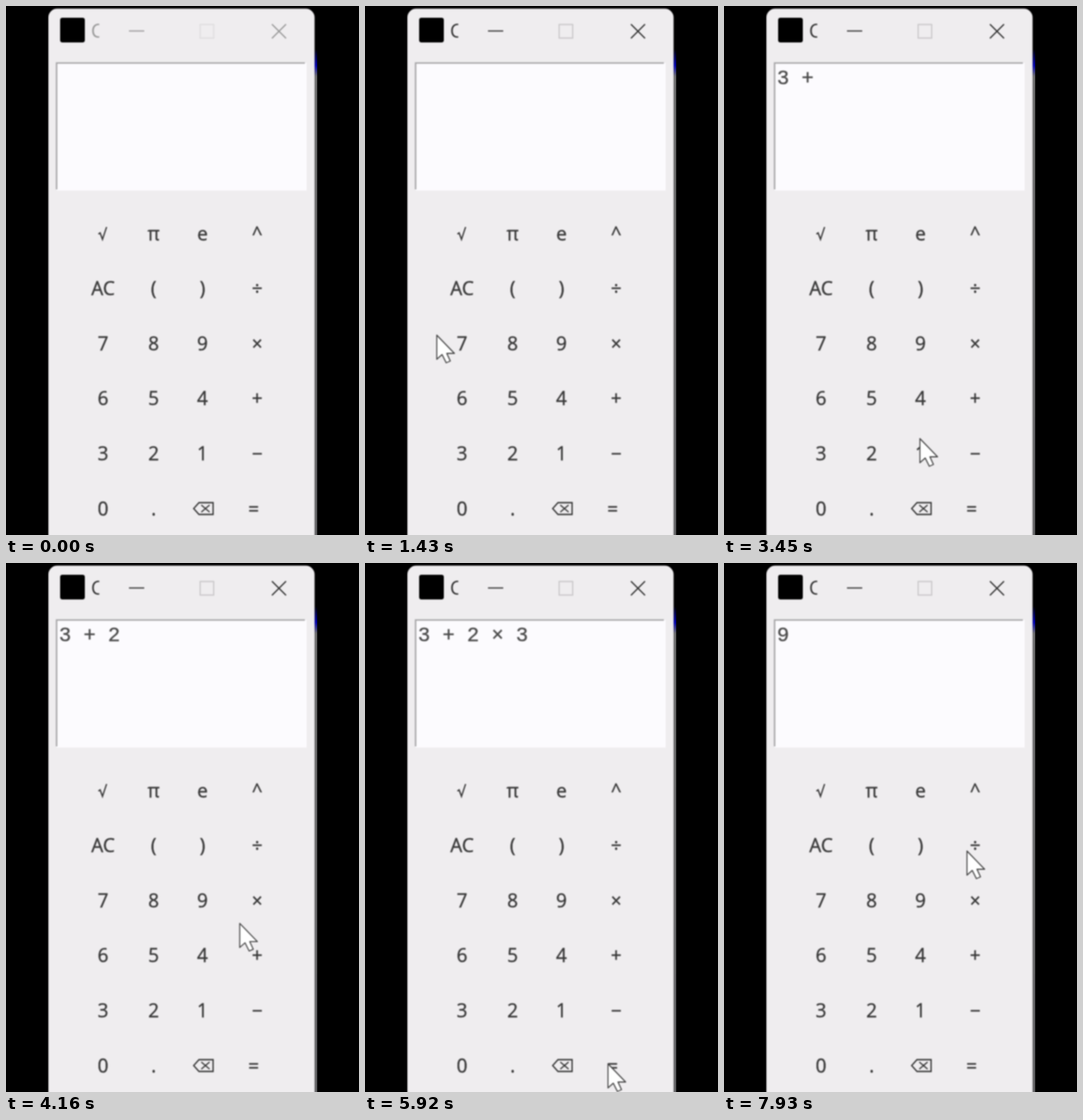
Write an HTML page that moves like this. It is 600x900 px and loops after 8 s.

```html
<!DOCTYPE html>
<html lang="en">
<head>
<meta charset="utf-8">
<title>Calculator</title>
<style>
  html, body { margin: 0; height: 100%; overflow: hidden; background: #000; }
  svg { display: block; width: 100vw; height: 100vh; }
  text { font-family: "Open Sans", "Noto Sans", sans-serif; font-size: 32px; }
  #keys { fill: #3a3a3a; stroke: #3a3a3a; stroke-width: .6; text-anchor: middle; }
  #keys path { fill: none; stroke-width: 2.3; }
  #entry { font: 34.7px "Liberation Mono", "Liberation Sans", monospace; fill: #4c4c4c; stroke: #4c4c4c; stroke-width: .5; white-space: pre; }
</style>
</head>
<body>
<svg viewBox="0 0 600 900">
  <defs>
    <clipPath id="view"><rect x="71" width="458" height="900"/></clipPath>
    <clipPath id="name"><rect x="140" y="20" width="18.5" height="50"/></clipPath>
    <linearGradient id="desk" x2="0" y2="1">
      <stop offset=".08" stop-color="#000"/>
      <stop offset=".11" stop-color="#0000a8"/>
      <stop offset=".13" stop-color="#666"/>
      <stop offset="1" stop-color="#5c5c5e"/>
    </linearGradient>
  </defs>
  <g clip-path="url(#view)" style="filter:blur(.9px)">
    <rect x="515" width="20" height="920" fill="url(#desk)"/>
    <rect x="72" y="4.5" width="452.5" height="930" rx="15" fill="#efedef"/>

    <rect x="92" y="20" width="42" height="42" rx="4"/>
    <g id="title">
      <text x="144.5" y="54" clip-path="url(#name)">C</text>
      <path id="controls" d="M209 42.5H235M452 31L476 55M476 31L452 55" stroke-width="2.2"/>
    </g>
    <rect id="max" x="330" y="31.5" width="23" height="23" fill="none" stroke-width="2.2"/>

    <rect x="86" y="97" width="425" height="217" fill="#fcfbfe"/>
    <path d="M508 97H86V312" fill="none" stroke="#a8a7a9" stroke-width="2.6"/>
    <text id="entry" x="90" y="133"></text>

    <g id="keys"></g>
    <g id="sunken" fill="none">
      <path d="M32 -45V44H-32" stroke="#fff" stroke-width="2"/>
      <path d="M33 -44.5H-31.5V44" stroke="#858585" stroke-width="3.5"/>
    </g>
    <path id="cursor" d="M0 0V41L9 33L16 47L23 44L17 31H30Z" fill="#fff" stroke="#454545" stroke-width="1.8" stroke-linejoin="round"/>
  </g>
</svg>
<script>
const LOOP = 8000, STEP = 65, FOCUS = 930, HOLD = 190, RESULT = 6440;
const $ = id => document.getElementById(id);
const columns = [165, 251, 334, 427];
const rows = ["√ π e ^", "AC ( ) ÷", "7 8 9 ×", "6 5 4 +", "3 2 1 −", "0 . ⌫ ="];
const icons = {
  "√": "M-8 1L-5 -1L-1 10L6 -11",
  "⌫": "M-15 0L-6 -10H18V10H-6ZM-2 -6L12 6M12 -6L-2 6"
};

const keys = {};
rows.forEach((row, r) => row.split(" ").forEach((label, c) => {
  const x = label === "=" ? 421 : columns[c], y = 387 + r * 93.6;
  const face = icons[label] ? `<path d="${icons[label]}"/>` : `<text y="11.5">${label}</text>`;
  $("keys").insertAdjacentHTML("beforeend", `<g>${face}</g>`);
  keys[label] = { x, y, node: $("keys").lastChild };
}));

// The cursor eases from stop to stop; a named key is tapped on arrival.
const stops = [
  { at: 450, x: 38, y: 520 },
  { at: 850, x: 122, y: 560 },
  { at: 1450, x: 122, y: 560 },
  { at: 2480, tap: "3" },
  { at: 3030, tap: "+" },
  { at: 3445, x: 333, y: 736 },
  { at: 3700, tap: "2" },
  { at: 4270, tap: "×" },
  { at: 4810, x: 343, y: 750 },
  { at: 5310, tap: "3" },
  { at: 5915, x: 413, y: 852 },
  { at: 6180, x: 436, y: 858 },
  { at: 6700, x: 436, y: 858 },
  { at: 7350, x: 420, y: 476 },
  { at: 7930, x: 413, y: 490 }
];
for (const s of stops) {
  s.leave = s.at;
  if (s.tap) {
    s.x = keys[s.tap].x + 6;
    s.y = keys[s.tap].y + 1;
    s.leave += HOLD;
  }
}
const taps = stops.filter(s => s.tap);

function cursorAt(t) {
  const next = stops.findIndex(s => s.at > t);
  if (next < 1) return stops.at(next);
  const a = stops[next - 1], b = stops[next];
  const u = Math.max(0, (t - a.leave) / (b.at - a.leave));
  const ease = u * u * (3 - 2 * u);
  return { x: a.x + (b.x - a.x) * ease, y: a.y + (b.y - a.y) * ease };
}

function place(node, { x, y }, shift = 0) {
  node.setAttribute("transform", `translate(${x + shift} ${y + shift})`);
}

function draw(t) {
  const active = t >= FOCUS;
  $("title").setAttribute("fill", active ? "#333" : "#999");
  $("controls").setAttribute("stroke", active ? "#303030" : "#999");
  $("max").setAttribute("stroke", active ? "#cbc9cb" : "#e0dee0");

  const typed = taps.filter(s => t >= s.leave).map(s => s.tap).join(" ");
  $("entry").textContent = t < RESULT ? typed : "9";

  const pressed = keys[taps.find(s => t >= s.at && t < s.leave)?.tap];
  for (const key of Object.values(keys)) place(key.node, key, key === pressed ? 2 : 0);
  $("sunken").setAttribute("visibility", pressed ? "visible" : "hidden");
  if (pressed) place($("sunken"), pressed);

  place($("cursor"), cursorAt(t));
}

function tick() {
  const t = performance.now() % LOOP;
  draw(Math.floor(t / STEP) * STEP);
  requestAnimationFrame(tick);
}
tick();
</script>
</body>
</html>
```
